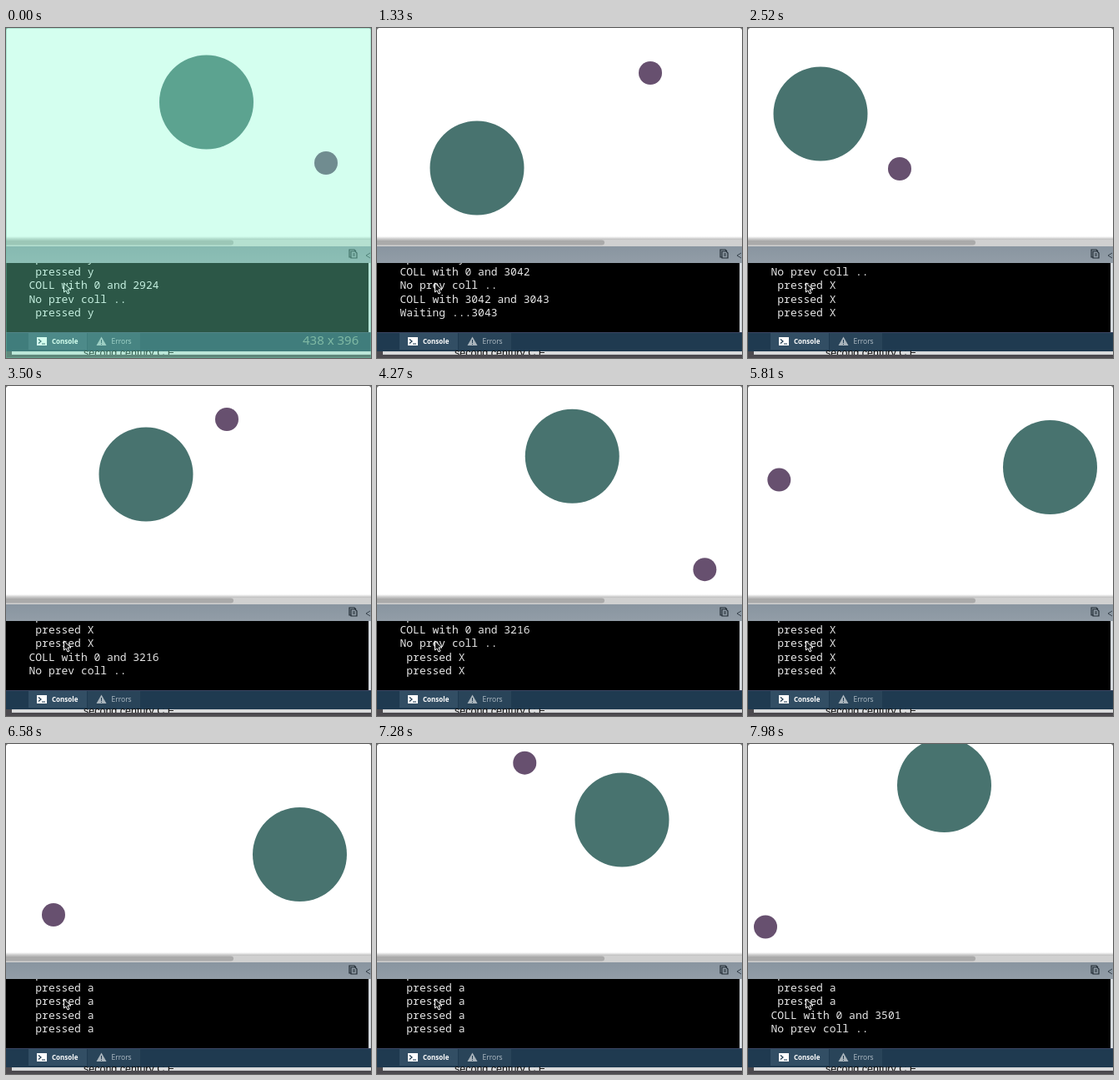
An HTML page with a canvas that plays this animation: 438 px wide and 396 px high, repeating every 8 s.

```html
<!DOCTYPE html>
<html lang="en">
<head>
<meta charset="utf-8">
<title>Bouncing balls with console</title>
<style>
  html, body { margin: 0; width: 100%; height: 100%; overflow: hidden; background: #fff; }
  canvas { display: block; width: 438px; height: 396px; }
</style>
</head>
<body>
<canvas id="stage"></canvas>
<script>
const W = 438, H = 396, LOOP = 8000, STEP = 70;
const canvas = document.getElementById('stage');
const ctx = canvas.getContext('2d');
const ratio = window.devicePixelRatio || 1;
canvas.width = W * ratio;
canvas.height = H * ratio;

// The room is slightly larger than the visible area.
const room = { left: -4, right: 445, top: -9, bottom: 253 };

// A key point is [ms, x, y, side wall, top or bottom wall]; the walls are hit on the way there.
const big = {
  radius: 56.5, color: '#48736f',
  path: [
    [0, 240.5, 89], [1330, 120, 168], [2520, 87, 103, 'left'], [3500, 168, 106],
    [5040, 300.5, 62.5], [6580, 352.5, 132.5, 'right'], [7980, 235.5, 49.5]
  ]
};
const small = {
  radius: 14, color: '#67506f',
  path: [
    [0, 384, 162], [910, 210, 113], [1330, 328, 54], [2520, 182, 169, 'right', 'top'],
    [3500, 265, 40, 'right', 'top'], [4880, 232, 115, 'right', 'bottom'],
    [5040, 228.5, 68.5], [5920, 10, 137, '', 'top'], [6580, 57, 205],
    [7400, 214, 60, 'left', 'top'], [7980, 21, 219.5]
  ]
};

function travel(from, to, k, side, radius) {
  if (!side) return from + (to - from) * k;
  const wall = room[side] + (side === 'left' || side === 'top' ? radius : -radius);
  const value = from + (2 * wall - to - from) * k;
  return (value - wall) * (from - wall) < 0 ? 2 * wall - value : value;
}

function drawBall({ path, radius, color }, t) {
  const i = Math.max(1, path.findIndex(key => key[0] >= t));
  const [t0, x0, y0] = path[i - 1];
  const [t1, x1, y1, sideX, sideY] = path[i];
  const k = (t - t0) / (t1 - t0);
  ctx.beginPath();
  ctx.arc(travel(x0, x1, k, sideX, radius), travel(y0, y1, k, sideY, radius), radius, 0, Math.PI * 2);
  ctx.fillStyle = color;
  ctx.fill();
}

const hold = (key, start, count, gap) =>
  Array.from({ length: count }, (_, i) => ({ t: start + i * gap, line: ' pressed ' + key }));

function hit(t, n, repeats = 0) {
  const lines = [`COLL with 0 and ${n}`, 'No prev coll ..'];
  for (let i = n + 1; i <= n + repeats; i++) lines.push(`COLL with ${i - 1} and ${i}`, `Waiting ...${i}`);
  return lines.map(line => ({ t, line }));
}

const log = [
  ...hold('y', -400, 2, 100), ...hit(-100, 2924), ...hold('y', 0, 2, 420),
  ...hit(910, 3042, 1), ...hit(1610, 3083), ...hold('X', 1610, 4, 400),
  ...hit(3430, 3216), ...hold('X', 3710, 2, 350), ...hit(4830, 3301, 3),
  ...hold('X', 5180, 5, 140), ...hold('a', 6020, 5, 70), ...hit(7630, 3501)
];

function rect(x, y, w, h, color) {
  ctx.fillStyle = color;
  ctx.fillRect(x, y, w, h);
}

function fade(y, h, from, to) {
  const gradient = ctx.createLinearGradient(0, y, 0, y + h);
  gradient.addColorStop(0, from);
  gradient.addColorStop(1, to);
  rect(0, y, W, h, gradient);
}

function text(value, x, y, font, color) {
  ctx.font = font;
  ctx.fillStyle = color;
  ctx.fillText(value, x, y);
}

function shape(d, fill, stroke, width = 1) {
  const path = new Path2D(d);
  if (fill) { ctx.fillStyle = fill; ctx.fill(path); }
  if (stroke) { ctx.strokeStyle = stroke; ctx.lineWidth = width; ctx.stroke(path); }
}

function clipped(x, y, w, h, draw) {
  ctx.save();
  ctx.beginPath();
  ctx.rect(x, y, w, h);
  ctx.clip();
  draw();
  ctx.restore();
}

function drawRoom(t) {
  rect(0, 0, W, 254, '#fff');
  clipped(0, 0, W, 253, () => [big, small].forEach(ball => drawBall(ball, t)));
  shape('M0 0H2L0 2Z M438 0H436L438 2Z', '#777');
  fade(250, 4, 'rgba(120,120,120,0)', 'rgba(120,120,120,.5)');
}

function drawToolbar() {
  rect(0, 254, W, 8, '#d0d0d0');
  shape('M0 254.5H270a3 3 0 0 1 0 6H0Z', '#aaa');
  fade(262, 20, '#8995a0', '#929da7');
  shape('M414 275h-2v-9h6l2 2 M414 268h5l2 2v6h-7z M416 271h3 M416 273h3', null, '#202a33', 1.2);
  shape('M437 270l-5 3 5 3', null, '#39444e');
}

function drawConsole(t) {
  rect(0, 282, W, 83, '#000');
  rect(435, 282, 3, 83, '#d2d7dc');
  const lines = log.filter(entry => entry.t <= t).slice(-5);
  clipped(0, 282, 435, 83, () => lines.forEach(({ line }, i) =>
    text(line, 27.5, 280.8 + i * 16.25, '13px "Noto Sans Mono", monospace', '#e6e6e6')));
  shape('M69.5 306v11l2.5-2 2 4 2-1-2-4h4z', '#111', '#fff');
}

function drawTabs() {
  rect(0, 365, W, 23, '#1f3a50');
  rect(0, 365, W, 1, '#3a4562');
  rect(27, 366, 70, 20, '#324e64');
  rect(98, 366, 63, 20, '#294459');
  rect(37, 371, 12, 10, '#fff');
  shape('M39 373.5l3 2.5-3 2.5 M43 379h4', null, '#1f3a50', 1.2);
  text('Console', 55, 379, 'bold 8px "Open Sans", sans-serif', '#fff');
  shape('M114.5 370.5l6 10.5h-12z', '#a9b4bc');
  rect(114, 374, 1, 4, '#1f3a50');
  rect(114, 379, 1, 1, '#1f3a50');
  text('Errors', 126.5, 379, '8.5px "Open Sans", sans-serif', '#b4c0c9');

  rect(0, 388, W, 8, '#4c4a4f');
  rect(7, 388, 431, 4, '#d9dadb');
  clipped(7, 387, 431, 5, () =>
    text('second century C.E.', 93, 394, '12.5px "Liberation Sans", Arial, sans-serif', '#111'));
}

function drawOverlay(strength) {
  if (!strength) return;
  ctx.globalAlpha = strength;
  rect(0, 0, W, H, 'rgba(130,255,208,.34)');
  ctx.strokeStyle = 'rgba(110,190,165,.4)';
  ctx.lineWidth = 1;
  ctx.strokeRect(.5, .5, W - 1, H - 1);
  text('438 x 396', 356, 380, '15px "Noto Sans", sans-serif', '#7fb9a4');
  ctx.globalAlpha = 1;
}

function draw(now) {
  const t = Math.floor((now % LOOP) / STEP) * STEP;
  ctx.setTransform(ratio, 0, 0, ratio, 0, 0);
  drawRoom(t);
  drawToolbar();
  drawConsole(t);
  drawTabs();
  drawOverlay(Math.max(0, 1 - t / 120));
}

const start = performance.now();
function tick() {
  draw(performance.now() - start);
  requestAnimationFrame(tick);
}
tick();
</script>
</body>
</html>
```
